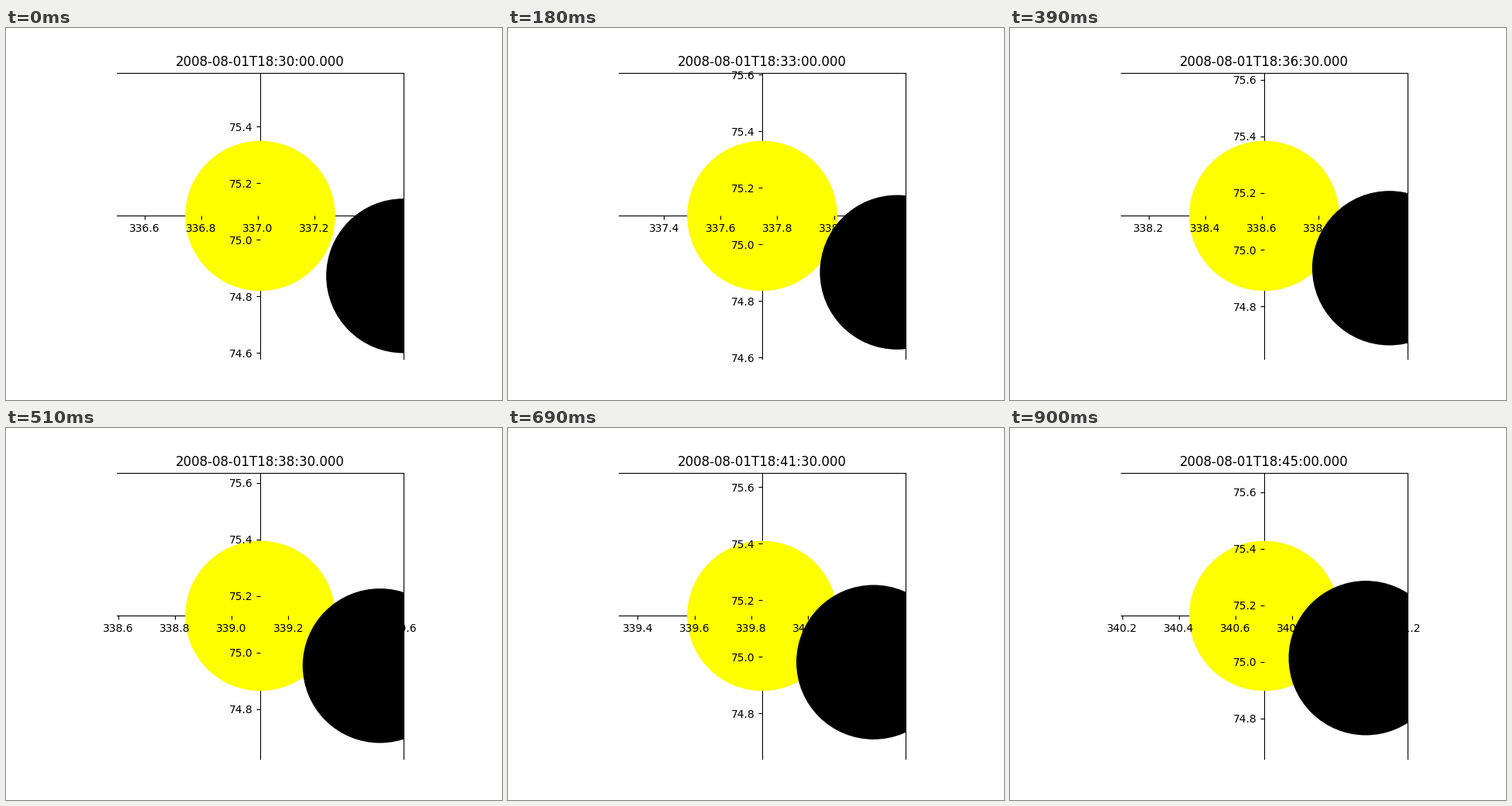
Animation of 640x480 px, one loop 930 ms. Source, as a matplotlib script:

```python
import matplotlib.pyplot as plt
from matplotlib.animation import FuncAnimation
from matplotlib.patches import Circle
from matplotlib.ticker import MultipleLocator

FRAMES = 31
INTERVAL = 30     # ms
HALF_VIEW = 0.5059  # degrees from the sun's centre to each edge
SUN_RADIUS = 0.265
MOON_RADIUS = 0.2728

plt.rcParams["font.family"] = "DejaVu Sans"
fig, ax = plt.subplots(figsize=(6.4, 4.8), dpi=100)
ax.set_aspect("equal")

# The axes cross at the centre of the view.
ax.spines["left"].set_position("center")
ax.spines["bottom"].set_position("center")
for axis in (ax.xaxis, ax.yaxis):
    axis.set_major_locator(MultipleLocator(0.2))
    axis.set_major_formatter("{x:.1f}")
    axis.set_zorder(4)

# Stacking: spines, sun, tick labels, moon.
sun = ax.add_patch(Circle((0, 0), SUN_RADIUS, fc="#ffff00", lw=0, zorder=3))
moon = ax.add_patch(Circle((0, 0), MOON_RADIUS, fc="black", lw=0, zorder=5))
title = ax.set_title("")


def sun_position(step):
    azimuth = 337.0081 + 0.1231 * step
    altitude = 75.0846 + 0.002737 * step - 4.65e-6 * step**2
    return azimuth, altitude


def moon_offset(step):
    return HALF_VIEW - 0.004892 * step, -0.2119 + 0.0021 * step


def update(step):
    x, y = sun_position(step)
    dx, dy = moon_offset(step)
    sun.center = x, y
    moon.center = x + dx, y + dy
    ax.set_xlim(x - HALF_VIEW, x + HALF_VIEW)
    ax.set_ylim(y - HALF_VIEW, y + HALF_VIEW)
    minutes, half = divmod(step, 2)
    title.set_text(f"2008-08-01T18:{30 + minutes}:{30 * half:02d}.000")
    return sun, moon, title


anim = FuncAnimation(fig, update, frames=FRAMES, interval=INTERVAL,
                     repeat=True, repeat_delay=0, blit=False)
plt.show()
```
